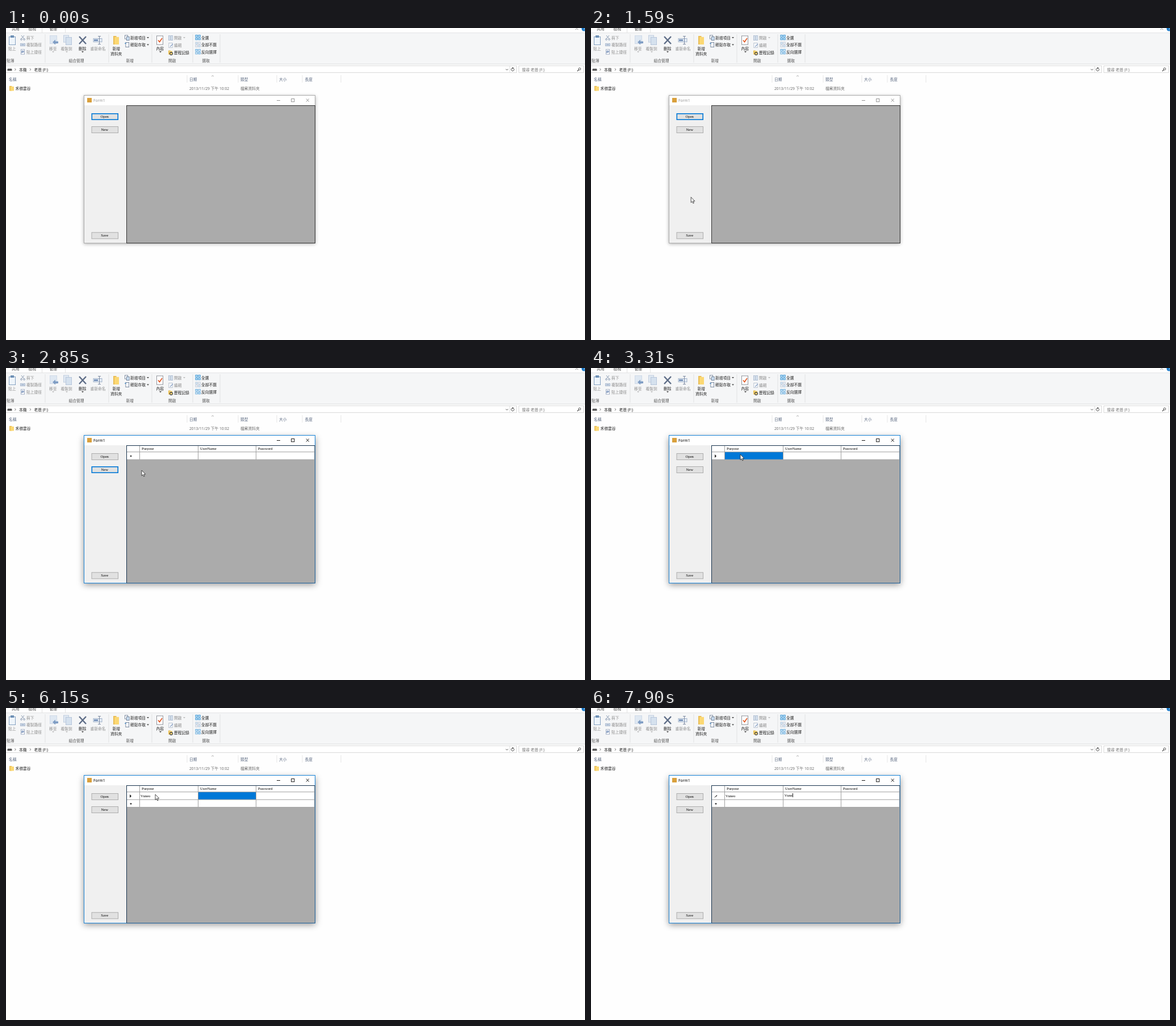
An HTML page with a canvas that plays this animation: 1020x549 px, repeating every 8 s.

```html
<!DOCTYPE html>
<html lang="zh-Hant">
<head>
<meta charset="utf-8">
<style>
html, body { margin: 0; width: 100%; height: 100%; overflow: hidden; background: #fff; }
canvas { display: block; }
</style>
</head>
<body>
<canvas id="stage" width="1020" height="549"></canvas>
<script>
const g = document.getElementById('stage').getContext('2d');
const SANS = '6.75px "Noto Sans", "Noto Sans CJK TC", sans-serif';
const SERIF = '6.7px "Liberation Serif", serif';
const BLUE = '#0078d7', GREY = '#8c8c8c', DARK = '#222';

function rect(color, x, y, w, h) {
  g.fillStyle = color;
  g.fillRect(x, y, w, h);
}
function box(fill, stroke, x, y, w, h, lw = 1) {
  rect(stroke, x, y, w, h);
  rect(fill, x + lw, y + lw, w - 2 * lw, h - 2 * lw);
}
function path(pts) {
  g.beginPath();
  for (let i = 0; i < pts.length; i += 2) g.lineTo(pts[i], pts[i + 1]);
}
function line(color, lw, ...pts) {
  path(pts);
  g.strokeStyle = color;
  g.lineWidth = lw;
  g.stroke();
}
function poly(color, ...pts) {
  path(pts);
  g.fillStyle = color;
  g.fill();
}
function ring(color, lw, x, y, r, from = 0, to = 7) {
  g.beginPath();
  g.arc(x, y, r, from, to);
  g.strokeStyle = color;
  g.lineWidth = lw;
  g.stroke();
}
// y is the middle of the line
function text(s, x, y, color = DARK, font = SANS) {
  g.font = font;
  g.fillStyle = color;
  g.fillText(s, x, y + (font === SERIF ? 2.1 : 2.5));
}
const drop = (x, y, c = '#444') => poly(c, x - 2, y - 1, x + 2, y - 1, x, y + 1.3);
const chevron = (x, y, c = '#555') => line(c, .8, x - 1.2, y - 2, x + .8, y, x - 1.2, y + 2);

function folder(x, y, w, h) {
  rect('#e9bd55', x, y, w * .55, h);
  rect('#fbd873', x + w * .2, y + h * .12, w * .8, h * .88);
}
function page(x, y, w, h, edge = '#9aa4b0', fill = '#fff') {
  box(fill, edge, x, y, w, h, .8);
}
function tiles(x, y, a, b) {
  [[0, 0, a], [5, 0, b], [0, 5, b], [5, 5, a]].forEach(([dx, dy, c]) =>
    box(c === a ? '#d5ebfa' : c, a, x + dx, y + dy, 4.2, 4.2, .9));
}

function ribbon() {
  rect('#f5f6f7', 0, 8, 1020, 55);
  rect('#e3e4e5', 0, 8, 1020, 1);
  rect('#dcddde', 0, 63, 1020, 1);
  text('共用', 10, 1.5, '#444');
  text('檢視', 39.5, 1.5, '#444');
  text('管理', 76.5, 1.5, '#444');
  rect('#e2e2e2', 63, 0, 1, 8);
  rect('#e2e2e2', 104, 0, 1, 8);
  line('#777', .8, 1003, 3, 1005.5, 1, 1008, 3);
  g.beginPath();
  g.arc(1018.5, 1, 4.5, 0, 7);
  g.fillStyle = '#1979ca';
  g.fill();
  text('?', 1017, 1, '#fff');
  for (const x of [69, 181, 257, 329, 377]) rect('#e1e2e4', x - .5, 11, 1, 50);

  // clipboard
  page(5, 15, 12, 15, '#6d8fb5', '#eef4fa');
  rect('#6d8fb5', 8, 13, 6, 4);
  line('#8d9db5', 1, 27, 13, 32, 19);
  line('#8d9db5', 1, 32, 13, 27, 19);
  ring('#8d9db5', .9, 27, 20, 1.4);
  ring('#8d9db5', .9, 32, 20, 1.4);
  box('#dce5f1', '#a7b6cb', 25, 27, 9, 5);
  line('#7189ad', .8, 27, 29.5, 32, 29.5);
  page(26, 37.5, 7, 9, '#8b9bb6');
  line('#5d7cad', 1, 28, 44, 28, 40.5, 31, 40.5, 31, 42.5, 28, 42.5);
  text('貼上', 4, 36, GREY);
  text('剪下', 36, 17, GREY);
  text('複製路徑', 36, 29.5, GREY);
  text('貼上捷徑', 36, 42, GREY);
  text('貼簿', 1, 57, '#555');

  // organise
  page(77, 13, 13, 15, '#cbd6e4', '#dfe8f2');
  poly('#7f9dc4', 82, 25, 87, 20.5, 87, 23.5, 92, 23.5, 92, 27, 87, 27, 87, 29.5);
  page(101, 12.5, 10, 13, '#b9c7da', '#dfe8f2');
  page(105, 16, 11, 14, '#b0c0d6', '#d5e1ee');
  drop(83, 42, '#bbb');
  drop(107, 42, '#bbb');
  line('#5d6c86', 2.4, 129, 15, 141, 28);
  line('#5d6c86', 2.4, 141, 15, 129, 28);
  drop(135, 42);
  box('#e4ecf5', '#a4b4ca', 153.5, 18, 16, 7);
  rect('#7893ba', 155, 20, 7, 3);
  line('#7d8ba3', 1, 162, 14.5, 167, 14.5);
  line('#7d8ba3', 1, 164.5, 14.5, 164.5, 28.5);
  line('#7d8ba3', 1, 162, 28.5, 167, 28.5);
  text('移至', 76, 36, GREY);
  text('複製到', 96.5, 36, GREY);
  text('刪除', 128, 36);
  text('重新命名', 148.5, 36, GREY);
  text('組合管理', 110.5, 57, '#555');

  // new
  folder(189, 14, 10, 15);
  text('新增', 187.5, 36);
  text('資料夾', 184, 45);
  page(209, 12.5, 6, 7, '#60718b');
  page(212, 15, 5.5, 7, '#60718b', '#cfe3f5');
  page(210.5, 25, 6.5, 9, '#60718b');
  line('#2b7cc5', 1, 209, 27, 212, 27);
  text('新增項目', 219, 17);
  text('輕鬆存取', 219, 29.5);
  drop(250, 17);
  drop(250, 29.5);
  text('新增', 211.5, 57, '#555');

  // open
  page(265, 13.5, 12, 16, '#7a7f87');
  line('#e25b28', 1.7, 268, 21.5, 270.5, 24.5, 275, 18);
  text('內容', 264.5, 36);
  drop(272, 42);
  page(286, 13, 3.5, 9, '#a9b9cf', '#dbe5f0');
  page(290, 13, 4, 9, '#a9b9cf', '#dbe5f0');
  text('開啟', 296, 17, GREY);
  drop(314, 17, '#bbb');
  page(286.5, 26, 7, 9, '#a9b5c6');
  line('#8aa4c8', 1.2, 289, 33, 294, 28);
  text('編輯', 296, 30, GREY);
  folder(286, 39.5, 7, 7);
  ring('#333', 1.1, 291, 45, 2.4);
  text('歷程記錄', 296, 43.5);
  text('開啟', 286, 57, '#555');

  // select
  tiles(333.5, 12, '#2d8fd2', '#d4eafa');
  tiles(333.5, 24.5, '#b9c6d6', '#f6f8fa');
  tiles(333.5, 37, '#5aa5da', '#f6f8fa');
  text('全選', 344, 17);
  text('全部不選', 344, 29.5);
  text('反向選擇', 344, 42);
  text('選取', 345.5, 57, '#555');
}

function explorer() {
  rect('#fefefe', 0, 0, 1020, 549);
  ribbon();
  box('#fff', '#dadada', -1, 66, 901, 13);
  box('#fff', '#dadada', 903, 66, 115, 13);
  rect('#aaa', 3, 71, 7, 2);
  rect('#444', 2.5, 72.5, 8, 2.5);
  chevron(16.5, 73);
  text('本機', 23, 73);
  chevron(43, 73);
  text('老爸 (F:)', 49.5, 73);
  line('#555', .9, 880.5, 72, 882.5, 74.2, 884.5, 72);
  rect('#e0e0e0', 887, 67, 1, 11);
  ring('#444', .9, 892.5, 73, 2.6, -.6, 4.7);
  poly('#444', 892, 69, 895, 70.5, 892, 72);
  text('搜尋 老爸 (F:)', 909, 73, '#777');
  ring('#444', .9, 1010.5, 72, 1.9);
  line('#444', 1.1, 1009, 73.5, 1006.5, 76);

  const head = { '名稱': 5, '日期': 323, '類型': 413, '大小': 481, '長度': 526.5 };
  for (const s in head) text(s, head[s], 90, '#5a6880');
  for (const x of [319, 409, 477, 522, 590]) rect('#e6e6e6', x - .5, 83, 1, 13);
  line('#888', .7, 362, 85.2, 364, 83.6, 366, 85.2);
  folder(6, 102, 8, 8.5);
  text('禾嶺雲谷', 16.5, 106.5);
  text('2013/11/29 下午 10:02', 323, 106.5, '#6d6d6d');
  text('檔案資料夾', 413, 106.5, '#6d6d6d');
}

// Timeline (ms)
const ACTIVE = 2390, TABLE = 2480, SELECT = 3310, EDIT1 = 4050, NEXT = 6150, EDIT2 = 6940, LOOP = 8000;
const typed1 = [[EDIT1, 'V'], [4290, 'Ve'], [4810, 'Veu'], [5080, 'Ve'], [5170, 'V'], [5260, 'Vu'],
  [5490, 'Vun'], [5540, 'Vune'], [5680, 'Vuneo']];
const typed2 = [[EDIT2, 'V'], [7120, 'Vu'], [7440, 'Vun'], [7900, 'Vune']];
const moves = [[170, 882, 540], [330, 650, 492], [530, 405, 436], [730, 243, 398], [880, 198, 387],
  [930, 194, 383], [1180, 181, 364], [1480, 177, 318], [1730, 175, 267], [1800, 175, 255],
  [2050, 173, 203], [2200, 173, 178], [2290, 173, 177], [2660, 176, 178], [2850, 239, 180],
  [3050, 254, 167], [3250, 263, 152], [LOOP, 263, 152]];

const latest = (list, t) => list.filter(e => e[0] <= t).pop();

function pointerAt(t) {
  const a = latest(moves, t);
  if (!a) return null;
  const b = moves[moves.indexOf(a) + 1];
  const held = a[0] === 2290 ? 0 : Math.floor((t - a[0]) / 50) * 50;
  const u = held / (b[0] - a[0]);
  return [a[1] + (b[1] - a[1]) * u, a[2] + (b[2] - a[2]) * u];
}

function button(label, y, focus, p, pressed) {
  const hover = p && p[0] >= 151 && p[0] < 198 && p[1] >= y && p[1] < y + 12;
  const fill = pressed ? '#cce4f7' : hover ? '#e5f1fb' : '#e1e1e1';
  const edge = pressed ? '#005499' : hover || focus ? BLUE : '#adadad';
  box(fill, edge, 150.5, y, 47.5, 12, focus ? 1.6 : 1);
  g.textAlign = 'center';
  text(label, 173.7, y + 6, '#000', SERIF);
  g.textAlign = 'left';
}

// A cell in edit mode; for its first 50 ms the old highlight shows below
function editor(x, list, t) {
  const s = latest(list, t)[1];
  text(s, x + 2.2, 153.6, '#000', SERIF);
  if (t < list[0][0] + 50) rect(BLUE, x + 1.5, 157, 100.5, 1.6);
  else rect('#000', x + 2.4 + g.measureText(s).width, 150, .9, 7);
}

function table(t) {
  const rows = t >= EDIT1 ? 2 : 1, bottom = 148 + rows * 13.3;
  rect('#fff', 213, 137, 331, bottom - 137);
  if (t >= SELECT && t < EDIT1) rect(BLUE, 236, 148, 102, 13);
  if (t >= NEXT && t < EDIT2) rect(BLUE, 339, 148, 101, 13);
  for (const x of [235, 338, 440, 543]) rect('#a0a0a0', x, 137, 1, bottom - 137);
  for (let i = 0; i <= rows; i++) rect('#a0a0a0', 213, 147.2 + i * 13.5, 331, 1);
  text('Purpose', 239, 142.3, '#000', SERIF);
  text('UserName', 342, 142.3, '#000', SERIF);
  text('Password', 444, 142.3, '#000', SERIF);

  const star = y => {
    for (let k = 0; k < 3; k++) {
      const c = Math.cos(k * 1.047) * 1.6, s = Math.sin(k * 1.047) * 1.6;
      line('#222', .8, 220 - c, y - s, 220 + c, y + s);
    }
  };
  if (rows === 2) star(168.5);
  if (t < SELECT) star(155);
  else if (t < EDIT1 || (t >= NEXT && t < EDIT2)) poly('#222', 218, 152, 221, 155, 218, 158);
  else {
    line('#333', 1.1, 219, 156.5, 222, 153.5);
    rect('#333', 217.3, 156.5, 1, 1);
  }
  if (t >= EDIT1 && t < NEXT) editor(236, typed1, t);
  if (t >= NEXT) text('Vuneo', 237, 154.7, '#000', SERIF);
  if (t >= EDIT2) editor(338.5, typed2, t);
}

function form(t, p) {
  const on = t >= ACTIVE, ink = on ? '#000' : '#999';
  g.save();
  g.shadowColor = on ? 'rgba(0,0,0,.42)' : 'rgba(0,0,0,.32)';
  g.shadowBlur = on ? 11 : 6;
  g.shadowOffsetY = on ? 3 : 1;
  rect('#fff', 137, 118.5, 408, 260.5);
  g.restore();
  box('#fff', on ? '#1883d7' : '#aaa', 137, 118, 408, 261);
  rect('#f0f0f0', 138, 136, 406, 242);
  rect('#d9a03c', 143, 123, 8, 8);
  text('Form1', 154, 127.3, ink);
  const mark = on ? '#000' : '#888';
  rect(mark, 477, 127, 6, .9);
  g.strokeStyle = mark;
  g.lineWidth = .9;
  g.strokeRect(502.7, 124.6, 5.2, 5.2);
  line(mark, .9, 528.7, 124.5, 534, 129.8);
  line(mark, .9, 534, 124.5, 528.7, 129.8);

  box('#ababab', on ? '#17324d' : '#333', 212, 136, 333, 243);
  if (on) {
    rect('#1b5f99', 544, 136, 1, 243);
    rect('#1b5f99', 212, 378, 333, 1);
  }
  const hot = t < SELECT ? p : null;
  button('Open', 150, !on, hot);
  button('New', 173, on && t < SELECT, hot, on && t < TABLE);
  button('Save', 359.3, false, hot);
  if (t >= TABLE) table(t);
}

function pointer(t, [x, y]) {
  if (t >= EDIT1 && t < NEXT) {
    if (t >= 4290) return;
    line('#000', .8, 262, 148.4, 266, 148.4);
    line('#000', .8, 264, 148.4, 264, 156.6);
    line('#000', .8, 262, 156.6, 266, 156.6);
    return;
  }
  if (t >= 7120) return;
  g.save();
  g.translate(x, y);
  path([0, 0, 0, 9.6, 2.2, 7.6, 3.7, 11, 5.2, 10.3, 3.8, 7, 6.7, 7]);
  g.closePath();
  g.fillStyle = '#fff';
  g.fill();
  g.strokeStyle = '#222';
  g.lineWidth = .8;
  g.stroke();
  g.restore();
}

function draw(now) {
  const t = now % LOOP, p = pointerAt(t);
  explorer();
  form(t, p);
  if (p) pointer(t, p);
}

const start = performance.now();
function frame() {
  draw(performance.now() - start);
  requestAnimationFrame(frame);
}
frame();
</script>
</body>
</html>
```
